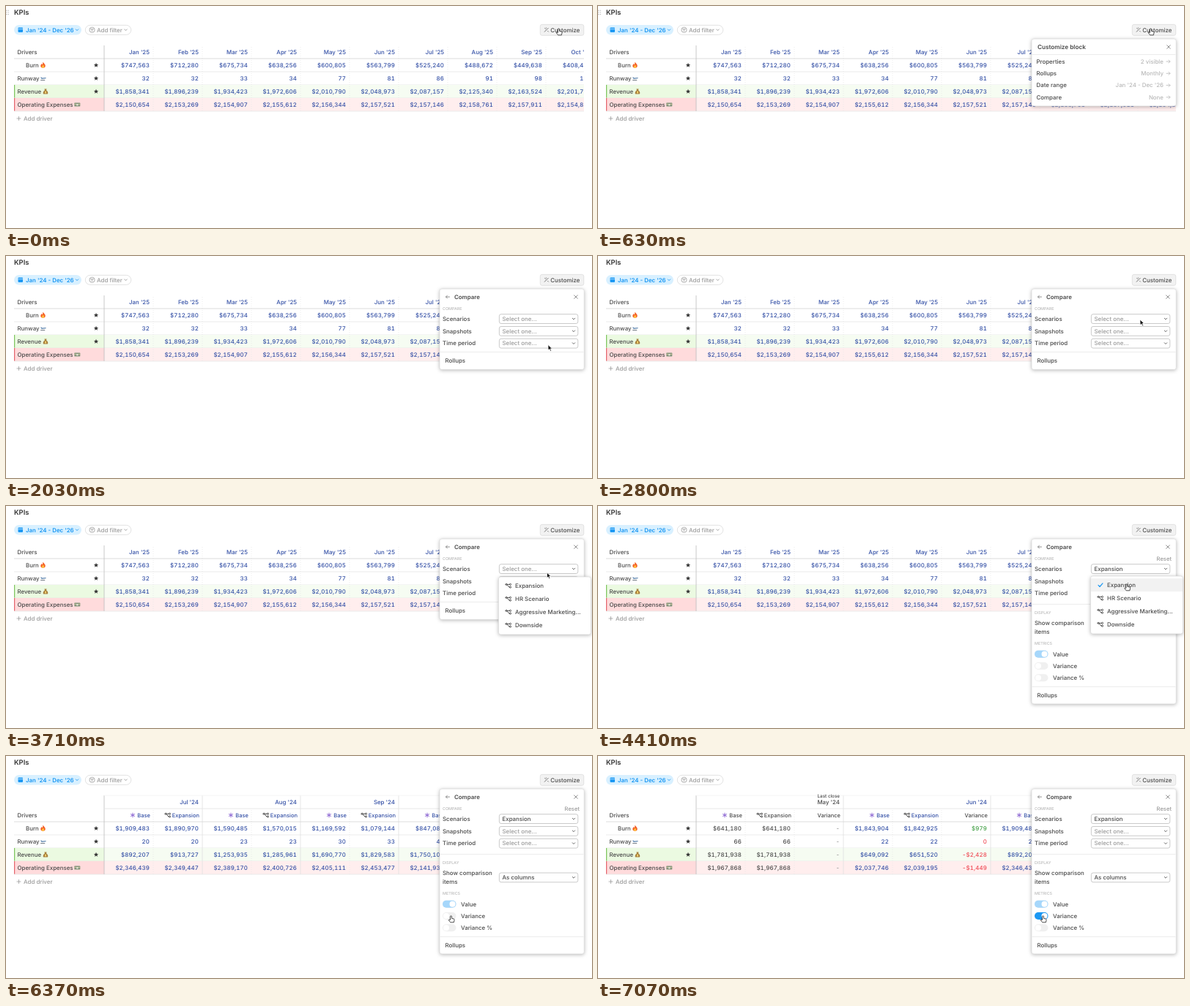
An HTML page that plays this animation: 800x304 px, repeating every 7490 ms.

```html
<!DOCTYPE html>
<html lang="en">
<head>
<meta charset="utf-8">
<title>KPIs</title>
<style>
  html, body { margin: 0; height: 100%; overflow: hidden; background: #fff; }
  svg { display: block; width: 800px; height: 304px; font: 500 8px Inter, sans-serif; text-rendering: geometricPrecision; }
  text { white-space: pre; }
  .num { font-variant-numeric: tabular-nums; letter-spacing: .15px; }
  .card { fill: #fff; stroke: #dadada; stroke-width: .7; filter: drop-shadow(0 1.5px 2.5px #0004); }
</style>
</head>
<body>
<svg id="stage" viewBox="0 0 800 304"></svg>
<script>
const LOOP = 7490, COL = 67, LEFT = 134, RIGHT = 789;
const INK = '#4a4a4a', BLUE = '#3450a6', GREY = '#9b9b9b', PALE = '#b9b9b9', SKY = '#1c98f3';

// Moments at which the interface changes
const OPEN = 420, LEAVE = 1190, COMPARE = 1890, DROPDOWN = 2940, PICK = 4410,
      SPLIT = 4550, CLOSE = 5880, TOGGLE = 6580, VARIANCE = 6930;

const PATH = [
  [0, 754.5, 31], [1120, 754.5, 31], [1610, 740, 121.5], [2310, 740, 121.5], [2730, 740, 87],
  [3080, 740, 87], [3360, 738.5, 91], [3700, 738.5, 91], [3990, 722, 107], [5100, 722, 107],
  [5210, 702, 163], [5320, 660.5, 201], [5460, 660.5, 201], [5800, 607.5, 219], [LOOP, 607.5, 219]
];

const clamp = (v, a, b) => Math.min(b, Math.max(a, v));

function cursorAt(t) {
  const i = PATH.findIndex(p => p[0] > t);
  const [t0, x0, y0] = PATH[i - 1], [t1, x1, y1] = PATH[i];
  let k = (t - t0) / (t1 - t0);
  k = k * k * (3 - 2 * k);
  return [x0 + (x1 - x0) * k, y0 + (y1 - y0) * k];
}

// Text is placed by the middle of its capitals
const text = (x, y, s, { fill = INK, size = 7.9, weight = 500, end = false, cls = '' } = {}) =>
  `<text x="${x}" y="${y + size * .364}" fill="${fill}" font-size="${size}" font-weight="${weight}"
    class="${cls}" text-anchor="${end ? 'end' : 'start'}">${s}</text>`;
const rect = (x, y, w, h, fill, r = 0, more = '') =>
  `<rect x="${x}" y="${y}" width="${w}" height="${h}" rx="${r}" fill="${fill}" ${more}/>`;
const line = (x1, y1, x2, y2, stroke = '#e6e6e6', more = '') =>
  `<path d="M${x1} ${y1}L${x2} ${y2}" stroke="${stroke}" stroke-width=".8" ${more}/>`;
const stroke = (x, y, d, color = INK, w = .9) =>
  `<path transform="translate(${x} ${y})" d="${d}" fill="none" stroke="${color}" stroke-width="${w}"
    stroke-linecap="round" stroke-linejoin="round"/>`;
const shape = (x, y, d, fill) => `<path transform="translate(${x} ${y})" d="${d}" fill="${fill}"/>`;
const fade = (t, start, body) =>
  t < start ? '' : `<g opacity="${clamp((t - start + 70) / 140, 0, 1)}">${body}</g>`;

const chevron = (x, y, color) => stroke(x, y, 'M-1.7-.8L0 .9L1.7-.8', color);
const arrow = (x, y, color, dir = 1) => stroke(x, y, `M${-2.5 * dir} 0H${2.5 * dir}M${.5 * dir}-2L${2.5 * dir} 0L${.5 * dir} 2`, color, .8);
const cross = (x, y) => stroke(x, y, 'M-2.3-2.3L2.3 2.3M2.3-2.3L-2.3 2.3', '#777', .8);
const branch = (x, y) => stroke(x, y,
  'M-1.8-1.8H1.4M-1.6-1.4Q-.6 2 1.4 2M-4-1.8a1.1 1.1 0 1 0 2.2 0a1.1 1.1 0 1 0-2.2 0' +
  'M1.4-1.8a1.1 1.1 0 1 0 2.2 0a1.1 1.1 0 1 0-2.2 0M1.4 2a1.1 1.1 0 1 0 2.2 0a1.1 1.1 0 1 0-2.2 0', '#333', .8);
const asterisk = (x, y) => stroke(x, y, 'M0-2.8V2.8M-2.5-1.4L2.5 1.4M-2.5 1.4L2.5-1.4', '#8a63d2', 1);
const star = (x, y) => shape(x, y, 'M0-3.2L.9-1.1L3.1-.9L1.4.6L2 2.8L0 1.6L-2 2.8L-1.4.6L-3.1-.9L-.9-1.1Z', '#333');

const flame = (x, y) =>
  shape(x, y, 'M-.3-4.2C2-2 3.6-.4 3.2 1.6C2.8 4.6-2.8 4.6-3.2 1.6C-3.4-.4-2.4-1-2-2L-1-.8Q.2-2.2-.3-4.2Z', '#f4622a') +
  shape(x, y, 'M.2-.6C2 1.4 2 3.6 0 3.7C-2 3.6-1.8 1.6.2-.6Z', '#ffc83d');
const plane = (x, y) =>
  shape(x, y, 'M-4-1.6L-2.8-1.5L-1.8-.4L3-.9Q4.2-.4 3 .3L-2.4.9Q-3.6.2-4-1.6Z', '#6288b0') +
  stroke(x, y, 'M-3.6 2.6H1.6', '#5c6670', .9);
const bag = (x, y) =>
  shape(x, y, 'M-1.6-3.6H1.6L1-1.8C3.6 0 4 3.6 2.2 3.6H-2.2C-4 3.6-3.6 0-1-1.8Z', '#a8813f') +
  shape(x, y, 'M-1-.2H1V2.4H-1Z', '#f0cf6a');
const bill = (x, y) => rect(x - 4, y - 2.4, 8, 4.8, '#84957c', .6) +
  rect(x - 4, y - 1, 8, .8, '#d8c9a0') + `<circle cx="${x}" cy="${y + .3}" r="1.2" fill="#dfe4d8"/>`;

const DRIVERS = [
  { name: 'Burn', x: 27, icon: flame(50.5, 0) },
  { name: 'Runway', x: 15.5, icon: plane(51.2, 0) },
  { name: 'Revenue', x: 15.5, icon: bag(54, 0), tint: ['#ebfae1', '#f6fcf2', '#7cc45c'] },
  { name: 'Operating Expenses', x: 15.5, icon: bill(97.3, 0), tint: ['#ffdbdc', '#ffeeee', '#e4636b'] }
];

const MONTHLY = {
  per: 1,
  months: ["Jan '25", "Feb '25", "Mar '25", "Apr '25", "May '25", "Jun '25", "Jul '25", "Aug '25", "Sep '25", "Oct '25"],
  rows: [
    '$747,563 $712,280 $675,734 $638,256 $600,805 $563,799 $525,240 $488,672 $449,638 $408,412',
    '32 32 33 34 77 81 86 91 98 107',
    '$1,858,341 $1,896,239 $1,934,423 $1,972,606 $2,010,790 $2,048,973 $2,087,157 $2,125,340 $2,163,524 $2,201,707',
    '$2,150,654 $2,153,269 $2,154,907 $2,155,612 $2,156,344 $2,157,521 $2,157,146 $2,158,761 $2,157,911 $2,154,820'
  ]
};
const SCENARIOS = {
  per: 2,
  months: ["Jul '24", "Aug '24", "Sep '24", "Oct '24"],
  rows: [
    '$1,909,483 $1,890,970 $1,590,485 $1,570,015 $1,169,592 $1,079,144 $847,083',
    '20 20 23 23 30 33 42',
    '$892,207 $913,727 $1,253,935 $1,285,961 $1,690,770 $1,829,583 $1,750,104',
    '$2,346,439 $2,349,447 $2,389,170 $2,400,726 $2,405,111 $2,453,477 $2,141,930'
  ]
};
const VARIANCES = {
  per: 3, closed: true,
  months: ["May '24", "Jun '24", "Jul '24"],
  rows: [
    '$641,180 $641,180 - $1,843,904 $1,842,925 $979 $1,909,483',
    '66 66 - 22 22 0 20',
    '$1,781,938 $1,781,938 - $649,092 $651,520 -$2,428 $892,207',
    '$1,967,868 $1,967,868 - $2,037,746 $2,039,195 -$1,449 $2,346,439'
  ]
};

function valueColor(value, col, { per, closed }) {
  if (value === '-') return GREY;
  if (col % per === 2) return value[0] === '$' ? '#43a047' : '#ef4a55';
  return closed && col < per ? INK : BLUE;
}

function table(spec) {
  const { per, months, rows, closed } = spec;
  const top = per > 1 ? 90 : 72, bottom = top + 72;
  const count = rows[0].split(' ').length;
  const rightOf = col => LEFT + COL * (col + 1) - 5;
  let out = '';

  DRIVERS.forEach(({ name, x, icon, tint }, i) => {
    const y = top + 18 * i;
    if (tint) out += rect(LEFT, y, RIGHT - LEFT, 18, tint[1]) + rect(11, y, LEFT - 11, 18, tint[0]) + rect(11, y, 1.2, 18, tint[2]);
    out += line(11, y + 18, RIGHT, y + 18) + text(x, y + 9, name) + `<g transform="translate(0 ${y + 9})">${icon}</g>`;
    if (i < 3) out += star(123, y + 9);
  });

  for (let col = 1; col <= count; col++) {
    const x = LEFT + COL * col;
    out += per > 1 && col % per === 0 ? line(x, 54, x, bottom, '#e0e0e0')
      : line(x, per > 1 ? 74 : 56, x, bottom, '#e6e6e6', 'stroke-dasharray="1 2"');
  }
  out += line(11, top, RIGHT, top, '#d4d4d4') + line(LEFT, 54, LEFT, bottom, '#bcbcbc') + text(15.5, top - 9, 'Drivers');
  if (per > 1) out += line(LEFT, 54, RIGHT, 54, '#f3f3f3') + line(LEFT, 72, RIGHT, 72, '#e2e2e2');

  months.forEach((month, i) =>
    out += text(rightOf(per * (i + 1) - 1), 63, month, { fill: closed && !i ? INK : BLUE, end: true }));
  if (closed) out += text(rightOf(2), 54.5, 'Last close', { size: 6.3, end: true });

  for (let col = 0; col < count; col++) {
    const right = rightOf(col), kind = col % per;
    const fill = closed && (col < per || kind === 2) ? INK : BLUE;
    if (per > 1) {
      out += text(right + 1, 81, ['Base', 'Expansion', 'Variance'][kind], { fill, end: true, size: 7.5 });
      if (kind === 0) out += asterisk(right - 23, 81);
      if (kind === 1) out += branch(right - 42, 81);
    }
    rows.forEach((row, i) => {
      const value = row.split(' ')[col];
      out += text(right, top + 18 * i + 9, value, { fill: valueColor(value, col, spec), end: true, cls: 'num' });
    });
  }
  return `<g clip-path="url(#tableClip)">${out}</g>` +
    stroke(17.5, bottom + 10, 'M-2.5 0H2.5M0-2.5V2.5', GREY, .8) + text(24, bottom + 10, 'Add driver', { fill: GREY });
}

function toolbar(t) {
  let out = text(11, 9, 'KPIs', { size: 9.4, weight: 600, fill: '#333' });
  if (t < LEAVE) for (let i = 0; i < 6; i++)
    out += rect(.2 + i % 2 * 2.4, 5.6 + (i >> 1) * 2.6, 1.2, 1.2, '#aaa', .6);
  out += rect(11, 26, 92, 13.5, '#d8f0ff', 6.75) + rect(16.5, 29.5, 6.5, 6.5, SKY, 1) + rect(16.5, 31, 6.5, .7, '#d8f0ff') +
    text(27, 32.7, "Jan '24 - Dec '26", { fill: SKY, weight: 600 }) + chevron(97, 32.7, SKY);
  out += rect(108.3, 26.3, 62.5, 13, '#fff', 6.5, 'stroke="#d6d6d6" stroke-width=".7"') +
    `<circle cx="117.5" cy="32.7" r="3.6" fill="none" stroke="${GREY}" stroke-width=".8"/>` +
    stroke(117.5, 32.7, 'M-1.8-1.2H1.8M-1.1.2H1.1M-.4 1.6H.4', GREY, .7) +
    text(124, 32.7, 'Add filter', { fill: GREY }) + chevron(163.5, 32.7, GREY);
  return out + rect(729.3, 25.3, 59.5, 15, '#f2f2f2', 2.5, 'stroke="#d8d8d8" stroke-width=".7"') +
    stroke(737.8, 32.7, 'M-2.6 2.6L2.4-2.4M-2.2-2.2L-1.4-1.4M1.8 1.6L2.6 2.4M-.4-2.8V-2.4', '#666', .9) +
    text(743.3, 32.7, 'Customize');
}

const divider = y => line(592.5, y, 788.5, y, '#e8e8e8');
const card = (x, y, w, h) => rect(x, y, w, h, '#fff', 3, 'class="card"');
const caption = (y, s) => text(596, y, s, { size: 5.4, fill: PALE });

function customizePanel(y) {
  const hovered = y > 68 ? Math.round((y - 76) / 16.3) : -1;
  const items = [['Properties', '2 visible'], ['Rollups', 'Monthly'], ['Date range', "Jan '24 - Dec '26"], ['Compare', 'None']];
  return card(592, 45, 197.3, 92) + text(600, 56, 'Customize block', { weight: 600, size: 8.2 }) + cross(779, 56) + divider(66.5) +
    items.map(([name, value], i) => {
      const mid = 76 + 16.3 * i, fill = i === hovered ? INK : PALE;
      return (i === hovered ? rect(592.5, mid - 8, 196.3, 16, '#f3f3f3') : '') +
        text(598.5, mid, name) + text(772, mid, value, { fill, end: true }) + arrow(778.5, mid, fill);
    }).join('');
}

const select = (y, label, value) =>
  (label ? text(596, y, label) : '') + rect(673.4, y - 6.3, 107.4, 12.8, '#fff', 2.5, 'stroke="#bdbdbd" stroke-width=".8"') +
  text(677.5, y, value || 'Select one...', { fill: value ? INK : GREY }) + chevron(775, y, '#555');

function toggle(y, label, on, color) {
  const k = clamp(on, 0, 1);
  return rect(596, y - 5, 18.5, 10, '#f0f0f0', 5) + rect(596, y - 5, 18.5, 10, color, 5, `opacity="${k}"`) +
    `<circle cx="${601 + 8.5 * k}" cy="${y}" r="4" fill="#fff"/>` + text(621, y, label);
}

function comparePanel(t) {
  const picked = t >= PICK;
  let out = card(592, 45, 197.3, picked ? 226 : 110.5) + arrow(603, 56, '#777', -1) +
    text(612, 56, 'Compare', { weight: 600 }) + cross(778, 56) + caption(72, 'COMPARE') +
    select(86, 'Scenarios', picked && 'Expansion') + select(102.8, 'Snapshots') + select(119.6, 'Time period');
  if (!picked) return out + divider(131.5) + text(599.5, 143.3, 'Rollups');
  return out + text(783, 72, 'Reset', { fill: GREY, end: true, size: 7.6 }) + divider(134.5) + caption(146, 'DISPLAY') +
    text(596, 160.3, 'Show comparison') + text(596, 172, 'items') + select(166.3, '', 'As columns') +
    caption(188, 'METRICS') + toggle(202.7, 'Value', 1, '#a6d7fb') +
    toggle(219, 'Variance', (t - TOGGLE) / 100, SKY) + toggle(235.3, 'Variance %', 0, SKY) +
    divider(247.5) + text(599.5, 258.7, 'Rollups');
}

function dropdown(t, y) {
  const top = t < PICK ? 97 : 96;
  const hovered = t > 3780 ? clamp(Math.round((y - top - 12) / 18), 0, 3) : -1;
  return card(672.5, top, 126, 79) +
    ['Expansion', 'HR Scenario', 'Aggressive Marketing...', 'Downside'].map((name, i) => {
      const mid = top + 12.2 + 18 * i;
      return (i === hovered ? rect(673, mid - 9, 125, 18, '#f2f2f2') : '') + text(695, mid, name) +
        (t >= PICK && !i ? stroke(686, mid, 'M-3 .2L-1 2.3L3-2.3', SKY, 1.2) : branch(686, mid));
    }).join('');
}

function pointer(t, x, y) {
  const hand = t < COMPARE + 70 || (t > 3850 && t < 5240) || t > CLOSE + 70;
  const d = hand
    ? 'M-1 .9A1 1 0 0 1 1 .9V3.4L3.7 4Q4.8 4.3 4.6 5.4L3.9 8.8H-.8L-3.2 5.8Q-3.2 4.5-1 5.4Z'
    : 'M0 0V7.6L1.8 6L3.1 8.8L4.5 8.2L3.2 5.5H5.6Z';
  return `<path transform="translate(${x.toFixed(2)} ${y.toFixed(2)})" d="${d}" stroke-linejoin="round" stroke-width=".8"
    fill="${hand ? '#fff' : '#111'}" stroke="${hand ? '#222' : '#fff'}"/>`;
}

function scene(t) {
  const [x, y] = cursorAt(t);
  return `<clipPath id="tableClip"><path d="M0 0H${RIGHT}V304H0Z"/></clipPath>` + toolbar(t) +
    table(t < SPLIT ? MONTHLY : t < VARIANCE ? SCENARIOS : VARIANCES) +
    (t < COMPARE ? fade(t, OPEN, customizePanel(y)) : comparePanel(t)) +
    (t < CLOSE ? fade(t, DROPDOWN, dropdown(t, y)) : '') + pointer(t, x, y);
}

const stage = document.getElementById('stage');
let shown = '';
function tick() {
  const next = scene(performance.now() % LOOP);
  if (next !== shown) stage.innerHTML = shown = next;
  requestAnimationFrame(tick);
}
tick();
</script>
</body>
</html>
```
